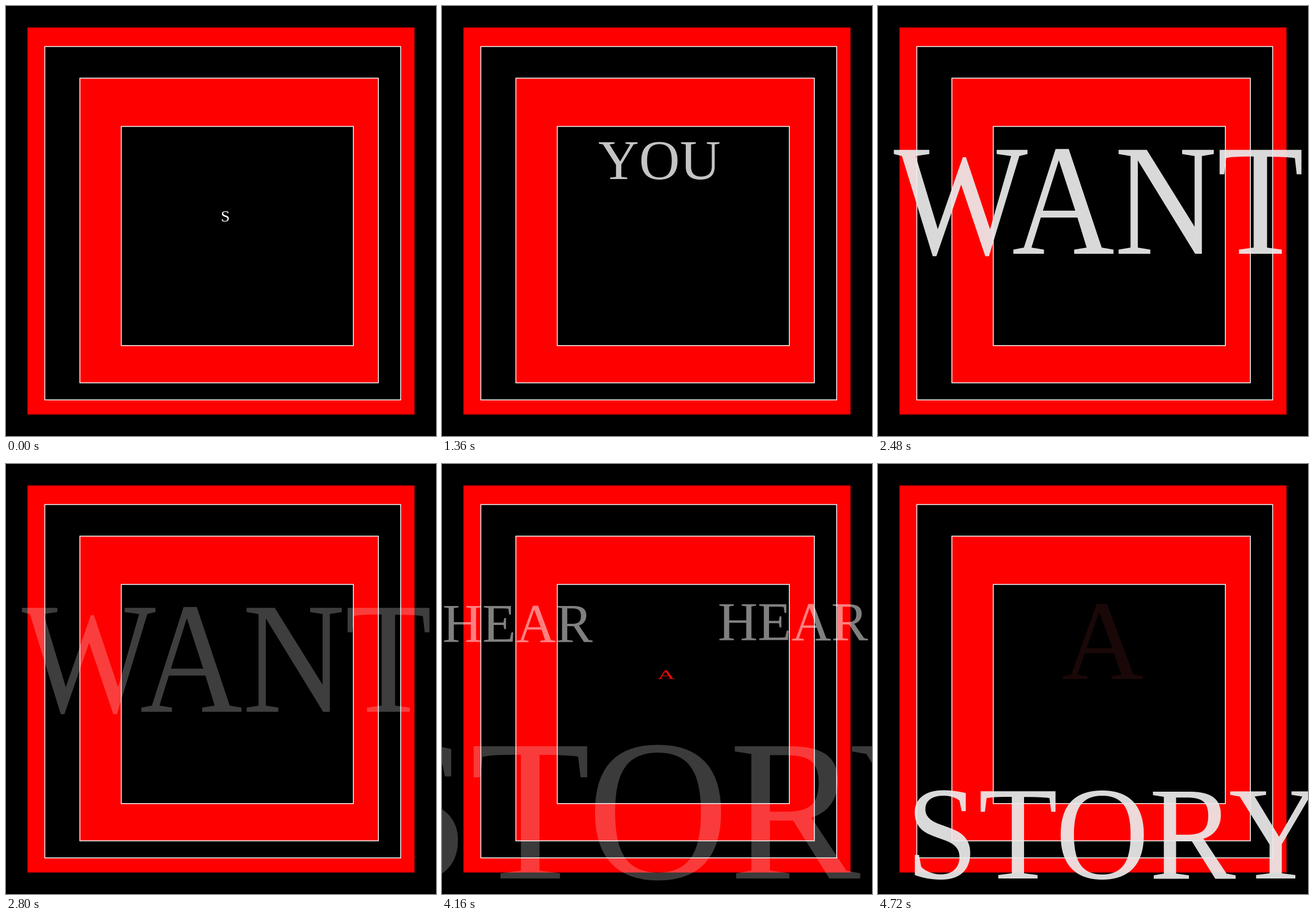
An HTML page with a canvas that plays this animation: 748 px wide and 748 px high, repeating every 4800 ms.

```html
<!DOCTYPE html>
<html lang="en">
<head>
<meta charset="utf-8">
<style>
  html, body { margin: 0; width: 100%; height: 100%; overflow: hidden; background: #000; }
  canvas { display: block; width: 100vw; height: 100vh; }
</style>
</head>
<body>
<canvas id="stage" width="748" height="748"></canvas>
<script>
const ctx = document.getElementById('stage').getContext('2d');
const STEP = 80, STEPS = 60, EM = 200;
const WHITE = [255, 255, 255], PALE = [236, 236, 236];
const FONT = `${EM}px "Times New Roman", "Liberation Serif", serif`;

// Each pose: centre x, baseline y, horizontal size, vertical size, opacity.
const words = [
  { text: 'S',  first: 0, last: 0, from: [381.5, 374.5, 28, 28, 1], to: [381.5, 374.5, 28, 28, 1] },
  { text: 'SO', first: 1, last: 14, from: [396, 385.4, 34.5, 34.5, .95], to: [460, 527, 132.6, 132.6, .26] },
  { text: 'YOU', first: 15, last: 21, from: [376, 375, 30, 30, 1], to: [382.5, 154, 235, 230, .3] },
  { text: 'WANT', first: 24, last: 31, color: PALE, from: [-246, 431, 247, 276, .25], to: [384, 431, 247, 276, .92] },
  { text: 'WANT', first: 32, last: 36, color: PALE, from: [384, 431, 247, 276, .75], to: [384, 431, 247, 276, .1] },
  { text: 'TO', first: 37, last: 44, from: [391, 374.3, 21, 21, 1], to: [391, 374.3, 147.5, 148, .34] },
  { text: 'HEAR', first: 50, last: 59, from: [62, 310, 96, 96, .643], to: [374, 310, 96, 96, 0] },
  { text: 'HEAR', first: 50, last: 59, from: [678, 307, 96, 96, .643], to: [374, 307, 96, 96, 0] },
  { text: 'A', first: 52, last: 59, color: [230, 10, 10], endColor: [26, 8, 8],
    from: [390, 374.3, 43, 22, 1], to: [391, 374.3, 197, 196, 1] },
  { text: 'STORY', first: 50, last: 59, color: PALE, from: [406.5, 721, 376, 386, .06], to: [411, 721, 226, 230, .92] }
];

const mix = (a, b, p) => a.map((v, i) => v + (b[i] - v) * p);

function box(left, top, right, bottom, fill, outlined) {
  ctx.fillStyle = fill;
  ctx.fillRect(left, top, right - left, bottom - top);
  if (outlined) ctx.strokeRect(left, top, right - left, bottom - top);
}

function drawFrame() {
  ctx.strokeStyle = '#fff';
  ctx.lineWidth = 1.5;
  box(0, 0, 748, 748, '#000');
  box(37.4, 37.4, 710.6, 710.6, '#f00');
  box(67.5, 70.5, 686.5, 685.2, '#000', true);
  box(128.5, 125.5, 647.7, 655.5, '#f00', true);
  box(200.5, 209.5, 604.3, 590.7, '#000', true);
}

function drawWord(word, step) {
  const p = (step - word.first) / (word.last - word.first || 1);
  const [x, y, wide, tall, alpha] = mix(word.from, word.to, p);
  const color = word.color || WHITE;
  ctx.save();
  ctx.globalAlpha = alpha;
  ctx.fillStyle = `rgb(${mix(color, word.endColor || color, p).map(Math.round)})`;
  ctx.translate(x, y);
  ctx.scale(wide / EM, tall / EM);
  ctx.font = FONT;
  ctx.fontKerning = 'normal';
  ctx.textAlign = 'center';
  ctx.fillText(word.text, 0, 0);
  ctx.restore();
}

function render(now) {
  const step = Math.floor(now / STEP) % STEPS;
  drawFrame();
  for (const word of words) {
    if (step >= word.first && step <= word.last) drawWord(word, step);
  }
  requestAnimationFrame(render);
}

render(0);
</script>
</body>
</html>
```
